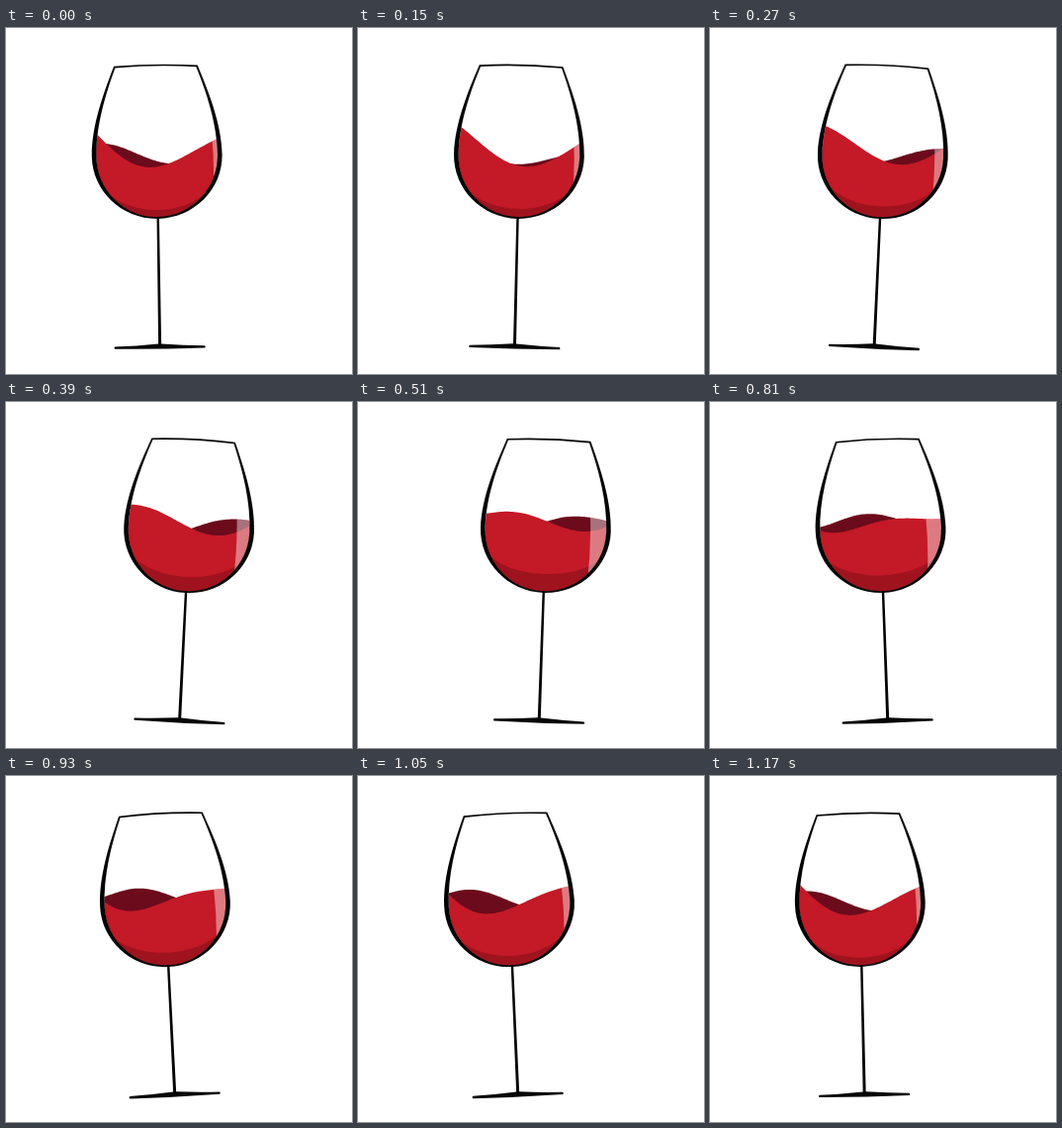
An HTML page with a canvas for the animation above (1200 ms loop, 350 by 350 pixels).

```html
<!DOCTYPE html>
<html lang="en">
<head>
<meta charset="utf-8">
<title>Swirling wine</title>
<style>
  html, body { margin: 0; width: 100%; height: 100%; overflow: hidden; background: #fff; }
  canvas { display: block; }
</style>
</head>
<body>
<canvas id="stage" width="350" height="350"></canvas>
<script>
const ctx = document.getElementById('stage').getContext('2d');
const LOOP = 1200, STEP = 30;
const RED = '#c41926', DARK = '#6b0b1c', SHADE = '#9e131e', INK = '#050505';
const GLARE = 'rgba(255,255,255,.42)';
const rad = deg => deg * Math.PI / 180;

// Wave heights at offset u from the bowl's axis: the near wave runs right, the far one left.
const nearWave = (u, phase) =>
  129 - 0.0034 * (u - 6) ** 2 + (12 - 0.07 * u) * Math.cos(phase - rad(8 + 2.15 * u));
const farWave = (u, phase) =>
  125.5 + 0.02 * u + (12.3 - 0.0014 * u * u) * Math.cos(phase - rad(33 - 1.8 * u + 0.005 * u * u));

function wavePath(wave, phase) {
  const path = new Path2D();
  path.moveTo(-72, 210);
  for (let u = -72; u <= 72; u += 2) path.lineTo(u, wave(u, phase));
  path.lineTo(72, 210);
  path.closePath();
  return path;
}

// Glass parts are drawn around the centre of the foot.
function bowlPath(rim, top, shoulder, side, bottom) {
  const path = new Path2D(), belly = -194;
  const low = belly + (bottom - belly) * 0.55;
  path.moveTo(-rim, top);
  path.bezierCurveTo(-shoulder, top + 26, -side, -225, -side, belly);
  path.bezierCurveTo(-side, low, -side * 0.55, bottom, 0, bottom);
  path.bezierCurveTo(side * 0.55, bottom, side, low, side, belly);
  path.bezierCurveTo(side, -225, shoulder, top + 26, rim, top);
  path.quadraticCurveTo(0, top - 3, -rim, top);
  path.closePath();
  return path;
}

const inner = bowlPath(41, -283.2, 51, 61.3, -131.9);
const outline = bowlPath(42.3, -284.8, 52.7, 65.9, -130.1);
outline.addPath(inner);

const stand = new Path2D('M-1.1-132L1.3-132L1.6-3.6Q24-1.7 45.5-1.2Q47 0 45.5 1.1' +
                         'Q0 2.2-45.5 1.1Q-47 0-45.5-1.2Q-24-1.7-1.4-3.6Z');

function crescentPath(phase) {
  const middle = -144.5 + 5.5 * Math.cos(phase), end = -174;
  const control = (middle - end / 4) / 0.75;
  const path = new Path2D();
  path.moveTo(-64, end);
  path.bezierCurveTo(-40, control, 40, control, 64, end);
  path.lineTo(70, -120);
  path.lineTo(-70, -120);
  return path;
}

function glarePath(phase) {
  const x = 50 + 6.5 * Math.cos(phase);
  const path = new Path2D();
  path.moveTo(x - 1, -220);
  path.quadraticCurveTo(x + 2.5, -180, x - 1, -140);
  path.lineTo(75, -140);
  path.lineTo(75, -220);
  return path;
}

function draw(t) {
  const phase = 2 * Math.PI * (t - 30) / LOOP;
  const footX = 170.7 - 15.3 * Math.cos(phase);
  const tilt = rad(2.9) * Math.sin(phase - rad(8));
  const inGlass = () => {
    ctx.setTransform(1, 0, 0, 1, footX, 323);
    ctx.rotate(tilt);
  };
  const inWine = () => ctx.setTransform(1, 0, 0, 1, footX + 200 * Math.sin(tilt), 0);
  const fill = (path, color, rule = 'nonzero') => {
    ctx.fillStyle = color;
    ctx.fill(path, rule);
  };

  ctx.setTransform(1, 0, 0, 1, 0, 0);
  ctx.fillStyle = '#fff';
  ctx.fillRect(0, 0, 350, 350);

  ctx.save();
  inGlass();
  ctx.clip(inner);

  inWine();
  const far = wavePath(farWave, phase);
  const near = wavePath(nearWave, phase);
  fill(far, DARK);
  fill(near, RED);
  const wine = new Path2D(far);
  wine.addPath(near);
  ctx.clip(wine);

  inGlass();
  fill(crescentPath(phase), SHADE);
  fill(glarePath(phase), GLARE);
  ctx.restore();

  inGlass();
  fill(outline, INK, 'evenodd');
  fill(stand, INK);
}

function tick() {
  const t = performance.now() % LOOP;
  draw(Math.floor(t / STEP) * STEP);
  requestAnimationFrame(tick);
}
tick();
</script>
</body>
</html>
```
